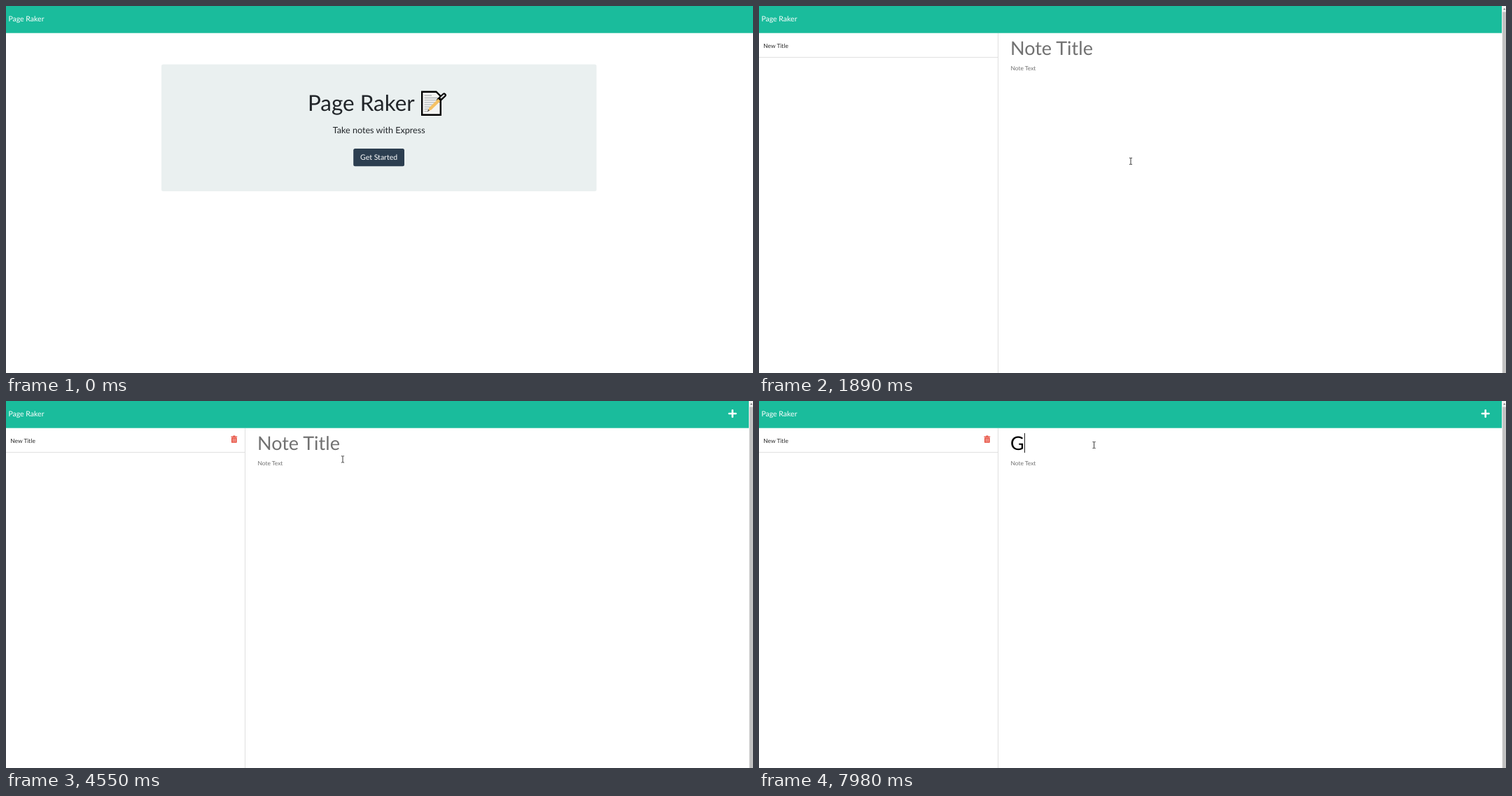
Animation of 1067x525 px, one loop 8000 ms. Source, as an HTML page:

```html
<!DOCTYPE html>
<html lang="en">
<head>
<meta charset="utf-8">
<title>Page Raker</title>
<style>
  html, body { margin: 0; width: 100%; height: 100%; overflow: hidden; background: #fff; }
  svg { display: block; width: 1067px; height: 525px; }
  text { font-family: Lato, sans-serif; fill: #212529; text-rendering: geometricPrecision; }
  .mid { text-anchor: middle; }
  .small { font-size: 8.45px; }
  .big { font-size: 27px; }
</style>
</head>
<body>
<svg viewBox="0 0 1067 525">
  <rect id="bar" width="1067" height="38.7" fill="#1abc9c"/>
  <text x="3.4" y="22.3" font-size="10.5" style="fill:#fff">Page Raker</text>

  <g id="home">
    <rect x="222" y="83.5" width="621.5" height="181.5" rx="2.5" fill="#eaf0f0"/>
    <text x="431" y="150" font-size="31.4">Page Raker</text>
    <g id="memo">
      <path d="M594.2 122.7H614.5L620.8 129V155.8H594.2Z" fill="#f4f4f2" stroke="#000" stroke-width="2.4"/>
      <path d="M597.5 128H608M597.5 131.5H617M597.5 134.7H617M597.5 137.9H615M597.5 141.1H612M597.5 144.3H609M597.5 147.5H605M597.5 150.7H603" stroke="#b4b8ba" stroke-width="1.3"/>
      <path d="M618.5 134.5L625.8 127.6" stroke="#000" stroke-width="6.2" stroke-linecap="round"/>
      <path d="M621.5 131.3L625.6 127.6" stroke="#d5d8da" stroke-width="2.2" stroke-linecap="round"/>
      <path d="M602.5 150.5L604.5 145.4L617.3 132.8L620.4 135.9L607.6 148.6Z" fill="#f5c163"/>
      <path d="M602 151L603.2 148L605 149.8Z" fill="#444"/>
    </g>
    <text class="mid" x="532.7" y="182.3" font-size="12.6">Take notes with Express</text>
    <rect id="ring" x="495.2" y="203.1" width="74.8" height="27" rx="3" fill="none" stroke="#8995a0" stroke-width="2"/>
    <rect id="button" x="496.2" y="203.9" width="72.8" height="25.3" rx="2.5"/>
    <text class="mid" x="532.6" y="220.1" font-size="10.5" style="fill:#fff">Get Started</text>
  </g>

  <g id="notes">
    <path d="M341.5 39V525M0 73.4H341" stroke="#dfdfdf"/>
    <text class="small" x="6.3" y="59.5" style="fill:#2b2b2b">New Title</text>
    <text id="hint" class="big" x="359" y="70" style="fill:#717171">Note Title</text>
    <text id="typed" class="big" x="359" y="70" style="fill:#000">G</text>
    <text class="small" x="359.4" y="91.8" style="fill:#717171">Note Text</text>
    <rect id="caret" y="46" width="1" height="28" fill="#222"/>
    <rect x="1061" width="6" height="525" fill="#f1f1f1"/>
    <rect x="1062" y="8.5" width="5" height="516.5" fill="#c1c1c1"/>
    <path d="M1063 5.2L1064.7 3.2L1066.4 5.2Z" fill="#606060"/>
    <g id="icons">
      <path d="M1037.7 13.2V22.8M1032.9 18H1042.5" stroke="#fff" stroke-width="2.6" stroke-linecap="round"/>
      <g fill="#e74c3c">
        <path d="M321.4 50.5H324L324.7 49.5H327L327.7 50.5H330.2V51.8H321.4Z"/>
        <rect x="322" y="52.3" width="7.7" height="7.5" rx=".9"/>
        <path d="M324 53.5V58.6M325.85 53.5V58.6M327.7 53.5V58.6" stroke="#fff" stroke-width=".6"/>
      </g>
    </g>
  </g>

  <g id="cursor">
    <path id="arrow" d="M.4 .4V9.3L2.5 7.5L3.9 10.6L5.3 10L3.9 6.9H6.7Z" fill="#fff" stroke="#111" stroke-width=".8"/>
    <path id="hand" d="M-1.1 7V1Q-1 .2 0 .2Q1 .2 1 1V4.8L5.2 5.6Q6.2 6 6.1 7.2L5.4 10.6L4.8 13H-.2L-2.9 9Q-3.5 7.6-2.6 7.2Q-1.8 7-1.1 8Z" fill="#fff" stroke="#111" stroke-width=".8"/>
    <path id="beam" d="M-2-4.6H-.6L0-4L.6-4.6H2M0-4V4M-2 4.6H-.6L0 4L.6 4.6H2" fill="none" stroke-width=".9"/>
  </g>
</svg>
<script>
const LOOP = 8000, CLICK = 1490, OPEN = 1890;
const $ = id => document.getElementById(id);
const show = (id, on) => $(id).style.display = on ? '' : 'none';
const clamp = v => Math.max(0, Math.min(1, v));

// Each move: start, end, number of steps, then [progress, x, y] points
const moves = [
  [240, 1020, 12, [0, 999, 513], [.3, 850, 410], [.6, 620, 270], [1, 506, 213]],
  [1090, 1170, 2, [0, 524, 220], [1, 531, 222]],
  [2080, 2280, 4, [0, 531, 222], [1, 528, 214]],
  [2610, 3380, 12, [0, 522, 213], [.545, 291, 164], [1, 193, 115]],
  [3450, 3940, 8, [0, 183, 110], [.6, 60, 47], [1, 30, 56]],
  [4340, 5030, 11, [0, 60, 58], [.2, 420, 80], [.3, 481, 83.4], [1, 478.6, 63]]
];

function pointer(t) {
  const move = moves.filter(m => m[0] <= t).pop();
  if (!move) return null;
  const [start, end, steps, ...points] = move;
  const last = steps - 1;
  const u = Math.min(last, Math.floor((t - start) / (end - start) * last + .01)) / last;
  const i = Math.max(1, points.findIndex(p => p[0] >= u - 1e-3));
  const [u0, x0, y0] = points[i - 1], [u1, x1, y1] = points[i];
  const k = clamp((u - u0) / (u1 - u0));
  return [x0 + (x1 - x0) * k, y0 + (y1 - y0) * k];
}

function shape(t, x, y) {
  if (t < OPEN) return t < 1090 ? 'arrow' : t < 1810 ? 'hand' : 'beam';
  if (x > 342) return 'beam';
  return x < 43 && y < 70 ? 'hand' : 'arrow';
}

function draw(t) {
  const open = t >= OPEN, typed = t >= 7780;
  show('home', !open);
  show('notes', open);
  $('bar').setAttribute('width', open ? 1061 : 1067);

  $('button').setAttribute('fill', t < 1090 ? '#2c3e50' : t < 1170 ? '#253544' : '#1e2b37');
  $('ring').setAttribute('opacity', clamp((Math.floor((t - CLICK) / 80) + 1) / 3));

  show('icons', t >= 2080);
  show('hint', !typed);
  show('typed', typed);
  show('caret', typed || t >= 5710 && t < 6240 || t >= 6770 && t < 7250);
  $('caret').setAttribute('x', typed ? 379 : 359.2);

  const at = pointer(t);
  show('cursor', at);
  if (!at) return;
  $('cursor').setAttribute('transform', `translate(${at})`);
  const kind = shape(t, ...at);
  for (const id of ['arrow', 'hand', 'beam']) show(id, id === kind);
  $('beam').setAttribute('stroke', open ? '#222' : '#a5abb0');
}

let begin;
function tick(now) {
  begin ??= now;
  draw((now - begin) % LOOP);
  requestAnimationFrame(tick);
}
draw(0);
requestAnimationFrame(tick);
</script>
</body>
</html>
```
